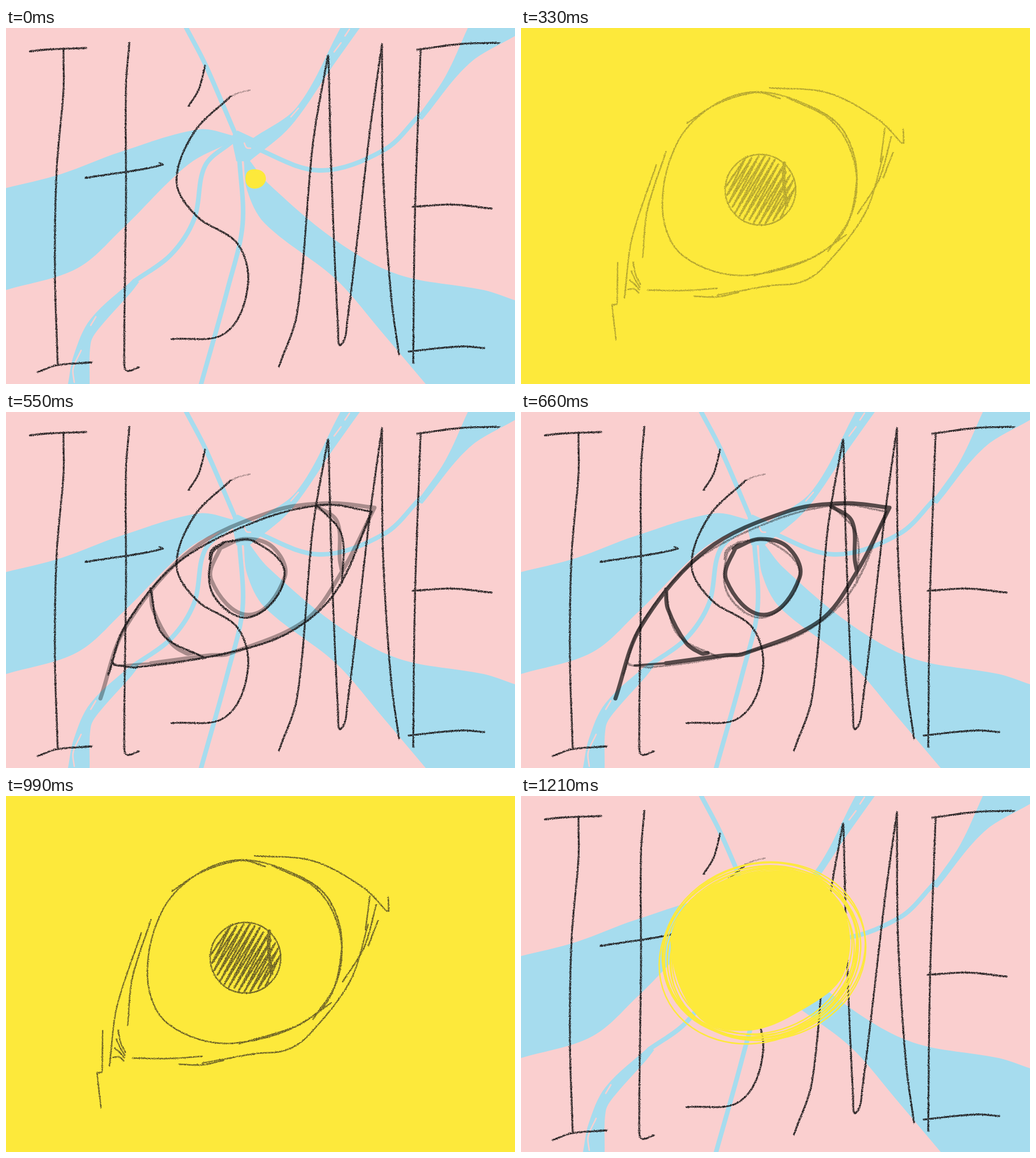
These frames come from a looping animation (895x625 px, 1320 ms). An HTML page:

```html
<!DOCTYPE html>
<html lang="en">
<head>
<meta charset="utf-8">
<title>It's me</title>
<style>
  html, body { margin: 0; width: 100%; height: 100%; overflow: hidden; background: #facfcf; }
  svg { display: block; width: 100%; height: 100%; }
  path, ellipse { stroke-linecap: round; stroke-linejoin: round; }
</style>
</head>
<body>
<svg id="stage" viewBox="0 0 895 625"></svg>
<script>
const PINK = '#facfcf', BLUE = '#a6dcee', YELLOW = '#fde93b', INK = '#1a1718', OLIVE = '#5f5524';
const STEP = 110, STEPS = 12;

let seed = 7;
const random = () => (seed = seed * 16807 % 2147483647) / 2147483647;
const range = n => [...Array(n).keys()];

// Smooth curve through key points; "|" ends a run, the next one is joined by a straight line.
function spline(text, closed) {
  const runs = text.split('|').map(run =>
    run.trim().split(/\s+/).map(pair => pair.split(',').map(Number)));
  const loop = closed && runs.length === 1;
  let d = '';
  for (const p of runs) {
    const n = p.length;
    const at = i => loop ? p[(i + n) % n] : p[Math.max(0, Math.min(n - 1, i))];
    d += (d ? 'L' : 'M') + p[0];
    for (let i = 0; i < n - !loop; i++) {
      const b = at(i), c = at(i + 1), a = at(i - 1), e = at(i + 2);
      const reach = Math.hypot(c[0] - b[0], c[1] - b[1]) / 3;
      // Tangents follow the neighbours, scaled to this segment's length.
      const handle = (from, to, o, sign) => {
        const len = Math.hypot(to[0] - from[0], to[1] - from[1]) || 1;
        return [0, 1].map(k => o[k] + sign * (to[k] - from[k]) / len * reach);
      };
      d += `C${handle(a, c, b, 1)} ${handle(b, e, c, -1)} ${c}`;
    }
  }
  return d + (closed ? 'Z' : '');
}

const stroke = (d, color, width) =>
  `<path d="${d}" fill="none" stroke="${color}" stroke-width="${width}"/>`;
const lines = (color, width, ...list) => list.map(p => stroke(spline(p), color, width)).join('');
const shape = (color, points, extra = '') => `<path d="${spline(points, true)}" fill="${color}" ${extra}/>`;
const layer = (id, content, extra = '') => `<g id="${id}" ${extra}>${content}</g>`;
const ROUGH = 'filter="url(#rough)"';

const rivers =
  shape(BLUE, '0,281 95,257 200,218 340,178 404,190 | 398,199 320,240 205,352 125,422 0,460') +
  shape(BLUE, '234,446 220,464 163,528 149,553 147,625 | 109,625 119,575 148,512 225,440') +
  shape(BLUE, '418,232 424,285 455,343 580,441 660,533 738,625 | 895,625 | 895,478 840,460 690,433 580,373 460,272 428,232') +
  shape(BLUE, '722,158 772,86 812,0 | 895,0 | 895,14 815,62 732,161') +
  shape(BLUE, '588,0 512,138 435,193 | 407,180 398,190 405,234 | 428,234 500,173 575,66 622,0') +
  lines(BLUE, 8, '317,0 350,63 405,190', '398,199 350,242 331,335 290,398 225,445',
    '410,225 416,345 390,457 343,625', '425,205 550,250 665,214 728,152') +
  lines(PINK, 2.5, '120,622 118,598 132,566', '149,522 158,507', '501,156 514,141',
    '577,42 589,26', '596,14 604,2', '419,202 423,210 430,211');

const letters = lines(INK, 3.3,
  '42,41 70,38 141,35', '101,38 101,110 89,250 86,430 91,592', '56,604 90,592 151,587',
  '217,26 211,100 211,300 208,590 213,602 233,596', '140,263 240,248 276,240 | 270,237',
  '350,66 339,108 321,137',
  '395,120 330,184 300,270 335,330 408,380 425,455 385,536 291,546',
  '480,594 512,500 540,200 566,49 | 567,49 572,250 584,530 589,556 600,515 640,180 661,28 | 661,28 663,250 677,470 691,573',
  '723,38 800,28 867,26', '729,38 719,330 716,588', '715,314 785,310 854,317', '708,568 800,559 841,562'
) + `<g opacity=".4">${lines(INK, 2, '430,109 412,113 395,120')}</g>`;

const bold = lines('#070707', 7,
  '166,503 210,378 325,243 470,174 570,160 648,168 | 648,168 592,278 526,366 390,425 360,427 255,441',
  '387,233 378,237 361,295 428,356 490,290 470,238 420,223 374,240',
  '255,312 258,345 290,405 318,424 328,423', '545,165 582,192 587,260 590,276'
) + lines('#070707', 4, '255,441 200,445');

const sketch = lines(INK, 3.4,
  '180,461 210,375 300,266 440,192 560,163 643,175 | 643,175 580,315 500,386 390,423 230,448 190,444 | 186,436',
  '385,228 436,227 490,285 430,360 365,322 362,250 385,228', '382,229 361,243 358,258',
  '254,310 275,390 350,432', '548,165 590,215 591,300');

const rings = range(9).map(i => {
  const x = 424 + 8 * Math.sin(i * 2.4), y = 275 + 5 * Math.cos(i * 1.9);
  return `<ellipse cx="${x}" cy="${y}" rx="${164 + i * 2}" ry="${142 + i * 1.4}"
    transform="rotate(${-19 - 6 * Math.sin(i * 3)} ${x} ${y})" fill="none" stroke="${YELLOW}" stroke-width="2.4"/>`;
}).join('');
const sun = rings +
  shape(YELLOW, '263,262 300,182 400,136 510,142 572,212 566,315 490,378 400,412 312,388');
const shine = shape('#fdec6e',
  '318,398 284,270 345,168 500,142 | 498,166 425,183 388,250 354,400', 'filter="url(#soft)"');

// Zigzag shading across the pupil, with unsteady ends.
const hatch = 'M' + range(25).map(i => {
  const o = i * 4.6 - 55, side = i % 2 ? 1 : -1;
  const h = side * Math.sqrt(62 ** 2 - o ** 2) * (.84 + .16 * random());
  return [421 + o * .87 + h * .5, 284 + o * .5 - h * .87];
}).join(' ');
const lashes = range(4).map(i => `${197 - i * 3},${411 + i * 16} ${202 - i},${434 + i * 8} ${210 - i},${450 + i * 5}`);

const pencilEye = stroke(spline('415,112 510,138 568,182 590,270 550,378 400,434 285,400 249,320 273,205 335,138', true), OLIVE, 2.5) +
  lines(OLIVE, 2.5, ...lashes,
    '292,167 345,133 415,113 456,124', '468,122 548,165 587,240 583,322 540,392', '410,435 510,404 572,363',
    '437,105 540,114 630,162 669,202 | 673,202 | 672,177',
    '640,176 632,235', '651,191 630,265 592,326', '654,219 637,263',
    '637,225 605,325 530,422 490,447 440,452 345,469', '305,471 345,472 383,464',
    '223,460 285,461 345,457', '255,217 222,320 214,403', '238,240 195,370 182,474',
    '170,412 169,485 | 160,486 | 160,486 167,547') +
  `<ellipse cx="421" cy="284" rx="62" ry="62" fill="none" stroke="${OLIVE}" stroke-width="2.5"/>` +
  stroke(hatch, OLIVE, 3.2) + lines(OLIVE, 6, '463,237 462,265 467,312');

const stage = document.getElementById('stage');
stage.innerHTML = `<defs>
  <filter id="rough" filterUnits="userSpaceOnUse" x="0" y="0" width="895" height="625" color-interpolation-filters="sRGB">
    <feTurbulence type="fractalNoise" baseFrequency=".7" numOctaves="2" seed="4" result="noise"/>
    <feDisplacementMap in="SourceGraphic" in2="noise" scale="3" xChannelSelector="R" yChannelSelector="G" result="edge"/>
    <feColorMatrix in="noise" values="0 0 0 0 0  0 0 0 0 0  0 0 0 0 0  0 0 2 0 -.15" result="grain"/>
    <feComposite in="edge" in2="grain" operator="in"/>
  </filter>
  <filter id="soft"><feGaussianBlur stdDeviation="6"/></filter>
  </defs><rect width="895" height="625" fill="${PINK}"/>` +
  rivers + layer('letters', letters, ROUGH) + layer('bold', bold) + layer('sketch', sketch, ROUGH) +
  layer('dot', shape(YELLOW, '421,266 425,252 438,248 452,253 457,265 451,277 438,282 426,278')) +
  layer('sun', sun) + layer('shine', shine) +
  layer('flood', `<rect width="895" height="625" fill="${YELLOW}"/>`) + layer('pencil', pencilEye, ROUGH);

// Layers with their opacity at a given step of the loop.
function scene(step) {
  if (step === 0) return { dot: 1 };
  if (step === 2) return { sun: 1, shine: 1 };
  if (step < 3 || step === STEPS - 1) return { sun: 1 };
  if (step < 5 || step > 8) return { flood: 1, pencil: step === 4 || step === 9 ? 1 : .5 };
  const ink = Math.min(1, (step - 4) / 3);
  return { bold: ink, sketch: Math.min(1, 1.5 * (1 - ink)) };
}

const parts = ['dot', 'sun', 'shine', 'flood', 'pencil', 'sketch', 'bold'].map(id => document.getElementById(id));
let start, shown = -1;
function draw(now) {
  start ??= now;
  const step = Math.floor(Math.max(0, now - start) / STEP) % STEPS;
  if (step !== shown) {
    shown = step;
    const visible = scene(step);
    for (const part of parts) {
      part.style.display = visible[part.id] ? '' : 'none';
      part.style.opacity = visible[part.id] ?? 0;
    }
  }
  requestAnimationFrame(draw);
}
draw(performance.now());
</script>
</body>
</html>
```
